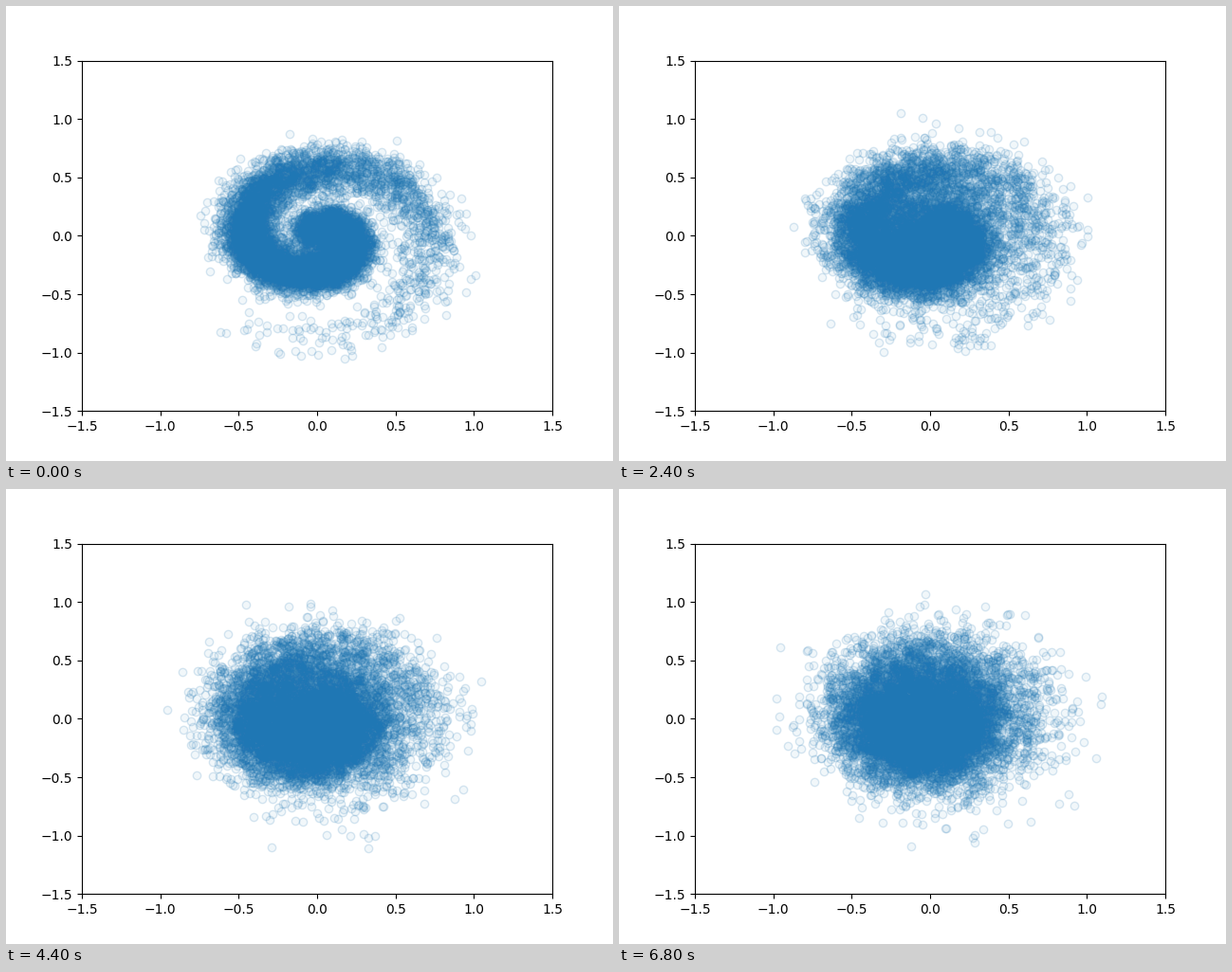
A matplotlib script for the animation above (7.2 s loop, 640x480 px).

```python
import numpy as np
import matplotlib.pyplot as plt
from matplotlib.animation import FuncAnimation

FRAMES = 18
INTERVAL = 400
COUNT = 10000
STEP_NOISE = 0.05
SPREAD = 0.28  # long-run standard deviation of the cloud
DECAY = np.sqrt(1 - (STEP_NOISE / SPREAD) ** 2)

rng = np.random.default_rng(7)


def spiral(count):
    """Noisy clockwise spiral that widens and thins out along its arm."""
    turn = rng.normal(5.2, 2.3, 2 * count)
    turn = turn[(turn > 0) & (turn < 11.5)][:count]
    radius = 0.72 * (turn / (3 * np.pi)) ** 1.2
    arm = np.array([-np.cos(turn), np.sin(turn)]) * radius
    return arm + rng.normal(0, 1, arm.shape) * (0.07 + 0.05 * radius)


def diffuse(points, steps):
    """Positions after each step of a slowly contracting random walk."""
    path = [points]
    for _ in range(steps):
        noise = rng.normal(0, STEP_NOISE, points.shape)
        path.append(DECAY * path[-1] + noise)
    return path


path = diffuse(spiral(COUNT), FRAMES - 2)

fig, ax = plt.subplots(figsize=(6.4, 4.8), dpi=100)
ax.set_xlim(-1.5, 1.5)
ax.set_ylim(-1.5, 1.5)
dots, = ax.plot([], [], "o", markersize=6, markeredgewidth=1,
                markerfacecolor=("#1f77b4", 0.06),
                markeredgecolor=("#1f77b4", 0.17))


def update(frame):
    # The opening picture holds for two intervals.
    dots.set_data(*path[max(0, frame - 1)])
    return dots,


anim = FuncAnimation(fig, update, frames=FRAMES, interval=INTERVAL,
                     init_func=lambda: update(0), repeat=True,
                     repeat_delay=0)
plt.show()
```
